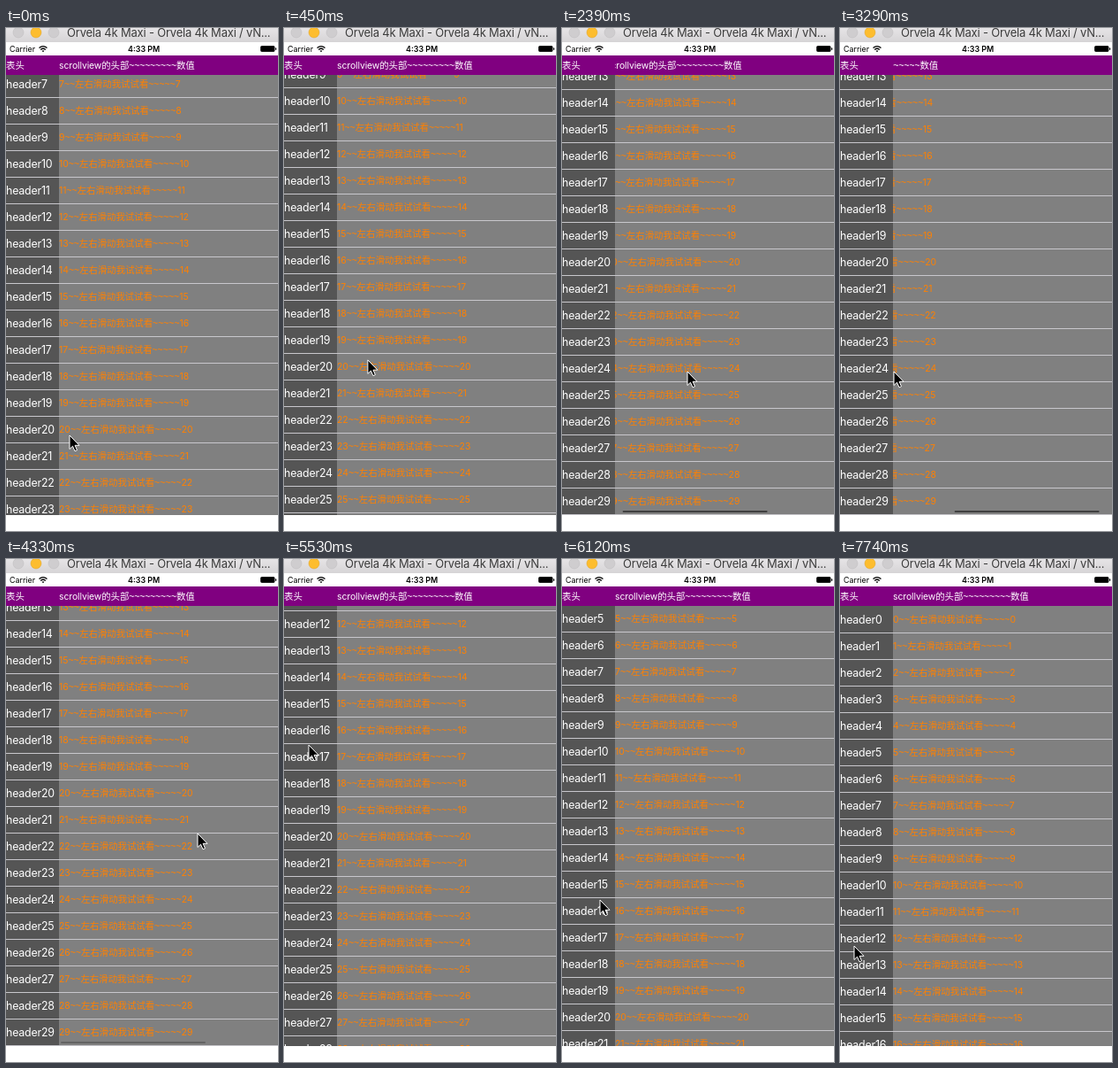
Animation of 308 by 568 pixels, one loop 8 s. Source, as an HTML page:

```html
<!DOCTYPE html>
<html lang="zh">
<head>
<meta charset="utf-8">
<style>
html, body { margin: 0; width: 100%; height: 100%; overflow: hidden; background: #fff; }
body { position: relative; font: 10.42px Inter, "Noto Sans CJK SC", "Noto Sans CJK", sans-serif; }
body > *, #bar { position: absolute; white-space: nowrap; }
i { font: 10.42px "Liberation Sans", sans-serif; }
#title { left: 0; top: 0; width: 308px; height: 16px; background: linear-gradient(#e6e4e6, #d6d4d6); }
#title span { position: absolute; left: 69px; top: -3px; font-size: 13px; line-height: 16px; letter-spacing: -.2px; color: #3c3c3c; }
.status { top: 18px; font-size: 8.9px; line-height: 11px; }
svg { left: 0; top: 0; overflow: visible; }
#head { left: 0; top: 31px; width: 308px; height: 22px; line-height: 24px; background: #800080; color: #fff; }
#list { left: 0; top: 53px; width: 308px; height: 497px; overflow: hidden; background: linear-gradient(90deg, #555 60px, #808080 60px); }
#rows { position: absolute; width: 308px; }
.row { position: relative; height: 29px; line-height: 29px; border-bottom: 1px solid #c8c7cc; }
.row b { font-weight: 400; font-size: 12.4px; letter-spacing: -.2px; color: #fff; }
.clip { position: absolute; left: 60px; right: 0; top: 0; bottom: 0; overflow: hidden; color: #ff8000; }
#head .clip { color: #fff; letter-spacing: -.1px; }
#bar { left: 61.5px; top: 492px; width: 164.5px; height: 2px; border-radius: 1px; background: rgba(0, 0, 0, .5); }
</style>
</head>
<body>
<div id="title"><span>Orvela 4k Maxi - Orvela 4k Maxi / vN...</span></div>
<span class="status" style="left:4px">Carrier</span>
<span class="status" style="left:138px;font-weight:600">4:33 PM</span>
<div id="head">表头<div class="clip"><div class="slide">scrollview的头部<i>~~~~~~~~~</i>数值</div></div></div>
<div id="list"><div id="rows"></div><div id="bar"></div></div>
<svg width="308" height="568">
  <g stroke="#bdbbbd" stroke-width=".5">
    <circle cx="14" cy="5" r="6" fill="#cfcdcf"/>
    <circle cx="34" cy="5" r="6" fill="#fdbd2e" stroke="#dfa023"/>
    <circle cx="54" cy="5" r="6" fill="#cfcdcf"/>
  </g>
  <g fill="none" stroke="#000" stroke-width="1.3">
    <path d="M37.5 22.6Q42 18.6 46.5 22.6M39.2 24.5Q42 22 44.8 24.5"/>
    <path d="M42 27.3L40.6 25.8Q42 24.8 43.4 25.8Z" fill="#000" stroke="none"/>
  </g>
  <rect x="288.5" y="20.5" width="15.5" height="6" rx="1" stroke="#000" stroke-width=".8"/>
  <rect x="305" y="22.3" width="1.2" height="2.5" rx=".6"/>
  <path id="cursor" d="M0 0V15.5L3.5 12.2L6 17.8L8.5 16.7L6.1 11.3H11Z" stroke="#fff"/>
</svg>
<script>
const LOOP = 8000, STEP = 149;
const rest = { x: 72, y: 460, scroll: 214.6, slide: 0, bar: 0 };

// gestures: first step, last step, pose reached
const moves = [
  [0, 8, { x: 133, y: 233, scroll: 404 }],
  [8, 10, { x: 194, y: 285 }],
  [10, 14, { x: 153, y: 392 }],
  [15, 16, { x: 142, y: 388, slide: 10, bar: 1 }],
  [16, 18, { x: 62, slide: 100 }],
  [21, 23, { x: 60, slide: 105 }],
  [28, 29, { x: 217, y: 310, slide: 0, bar: .45 }],
  [29, 30, { bar: 0 }],
  [29, 34, { x: 25, y: 121 }],
  [34, 35, { y: 155 }],
  [36, 37, { x: 28, y: 210, scroll: 355 }],
  [37, 41, { x: 43, y: 385, scroll: 151 }],
  [42, 46, { x: 28, y: 136 }],
  [47, 52, { x: 16, y: 437, scroll: 0 }]
];

const $ = id => document.getElementById(id);

function poseAt(n) {
  const pose = { ...rest };
  for (const [from, to, goal] of moves) {
    const p = Math.min(1, Math.max(0, (n - from) / (to - from)));
    for (const k in goal) pose[k] += (goal[k] - pose[k]) * p;
  }
  return pose;
}

$("rows").innerHTML = Array.from({ length: 30 }, (_, i) =>
  `<div class="row"><b>header${i}</b><div class="clip"><div class="slide">${i}<i>~~</i>左右滑动我试试看<i>~~~~~</i>${i}</div></div></div>`
).join("");
const slides = document.querySelectorAll(".slide");

const start = performance.now();
function draw() {
  const time = (performance.now() - start) % LOOP;
  const { x, y, scroll, slide, bar } = poseAt(Math.floor((time + 9) / STEP));
  $("cursor").setAttribute("transform", `translate(${x} ${y})`);
  $("rows").style.top = `${1 - scroll}px`;
  for (const s of slides) s.style.transform = `translateX(${-slide}px)`;
  $("bar").style.transform = `translateX(${slide * .66}px)`;
  $("bar").style.opacity = bar;
  requestAnimationFrame(draw);
}
draw();
</script>
</body>
</html>
```
